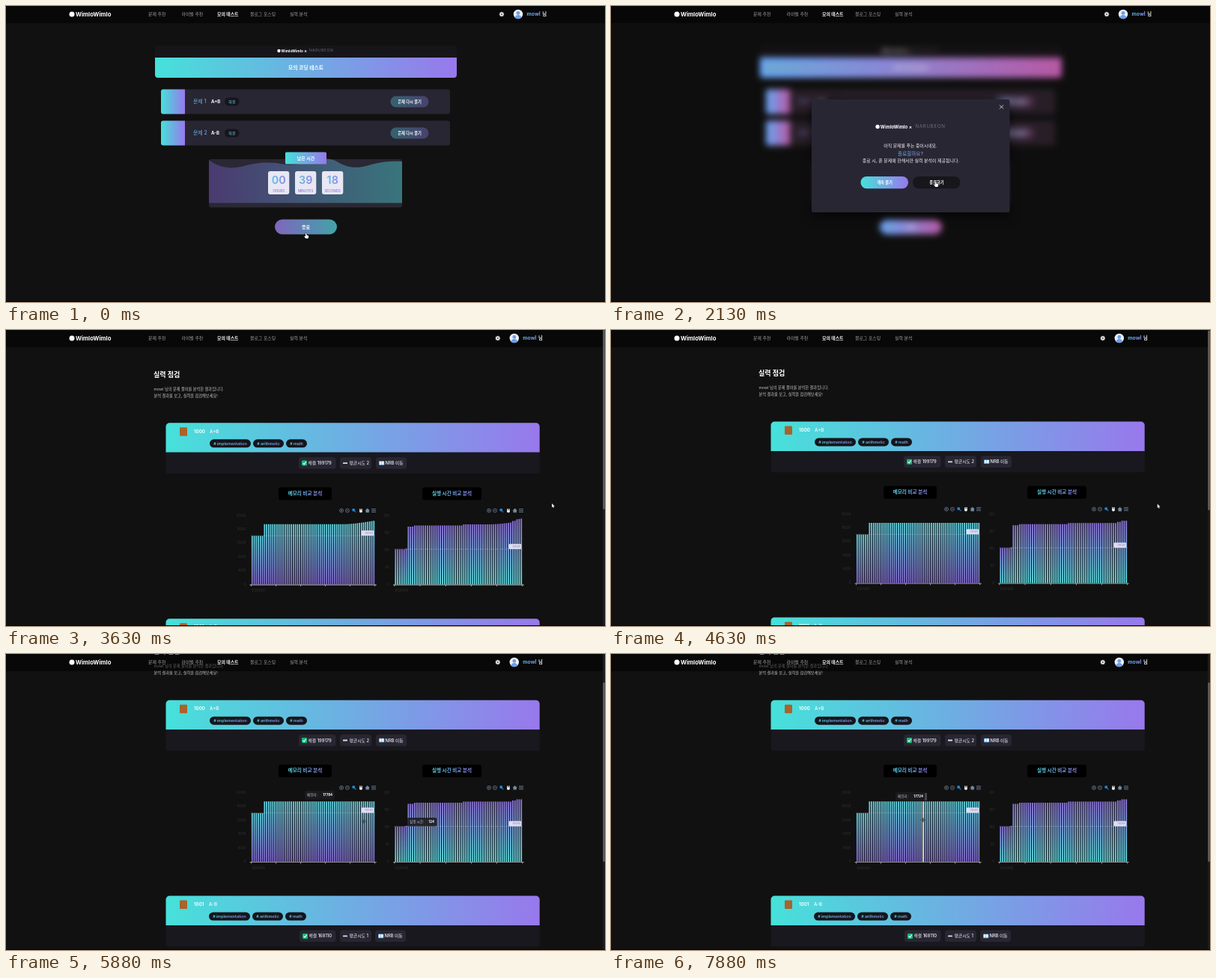
An HTML page with a canvas that plays this animation: 800 by 396 pixels, repeating every 8000 ms.

```html
<!DOCTYPE html>
<html lang="ko">
<head>
<meta charset="utf-8">
<title>모의 테스트</title>
<style>
html, body { margin: 0; width: 100%; height: 100%; overflow: hidden; background: #111; }
canvas { display: block; width: 800px; height: 396px; }
</style>
</head>
<body>
<canvas id="stage" width="800" height="396"></canvas>
<script>
const LOOP = 8000, W = 800, H = 396;
const TEAL = '#46e1da', PURPLE = '#9878ec', PANEL = '#282632', WHITE = '#f4f4f6';
const FONT = 'Inter, "Noto Sans CJK KR", "Noto Sans CJK", sans-serif';
const SITE = 'WimloWimlo', PARTNER = 'NARUBEON', USER = 'mowl';
const T_MODAL = 450, T_RESULT = 2380, T_MARKS = 3350;

const stage = document.getElementById('stage').getContext('2d');
const back = document.createElement('canvas');
back.width = W;
back.height = H;
const backCtx = back.getContext('2d');
let g = stage;

const clamp = v => Math.max(0, Math.min(1, v));
const smooth = v => v * v * (3 - 2 * v);

// Interpolates rows of [time, ...values]
function track(rows, t, ease = v => v) {
  let i = 0;
  while (i < rows.length - 2 && t >= rows[i + 1][0]) i++;
  const a = rows[i], b = rows[i + 1];
  const k = ease(clamp((t - a[0]) / (b[0] - a[0])));
  return a.slice(1).map((v, j) => v + (b[j + 1] - v) * k);
}

function lin(x0, x1, a = TEAL, b = PURPLE) {
  const f = g.createLinearGradient(x0, 0, x1, 0);
  f.addColorStop(0, a);
  f.addColorStop(1, b);
  return f;
}

function box(x, y, w, h, fill, r = 0) {
  g.fillStyle = fill;
  g.beginPath();
  g.roundRect(x, y, w, h, r);
  g.fill();
}

function disc(x, y, r, fill) {
  g.fillStyle = fill;
  g.beginPath();
  g.arc(x, y, r, 0, 7);
  g.fill();
}

function line(points, color, w = 0.8) {
  g.strokeStyle = color;
  g.lineWidth = w;
  g.beginPath();
  points.forEach(([x, y], i) => i ? g.lineTo(x, y) : g.moveTo(x, y));
  g.stroke();
}

function text(s, x, y, size, fill = WHITE, weight = 500, align = 'left') {
  g.font = `${weight} ${size}px ${FONT}`;
  g.textAlign = align;
  g.fillStyle = fill;
  g.fillText(s, x, y + size * 0.36);
}

const centered = (s, x, y, size, fill, weight) => text(s, x, y, size, fill, weight, 'center');

function logo(x, y, w) {
  const k = w / 55;
  disc(x + 4 * k, y, 3.5 * k, '#fff');
  text(SITE, x + 9 * k, y, 7.7 * k, '#fff', 700);
}

function partner(x, y, size) {
  g.letterSpacing = size * 0.13 + 'px';
  text(PARTNER, x, y, size, '#85838d', 300);
  g.letterSpacing = '0px';
}

function nav(shift) {
  box(0, 0, W, 23, 'rgba(0,0,0,.5)');
  logo(84, 11, 55);
  const items = [['문제 추천', 190], ['라이벌 추천', 234.5], ['모의 테스트', 282], ['블로그 포스팅', 326], ['실력 분석', 379]];
  items.forEach(([s, x], i) => text(s, x, 10.8, 5.9, i === 2 ? '#fff' : '#a2a2a4', i === 2 ? 700 : 400));
  g.save();
  g.translate(shift, 0);
  for (let i = 0; i < 8; i++) {
    const c = Math.cos(i * Math.PI / 4), s = Math.sin(i * Math.PI / 4);
    line([[662, 11], [662 + c * 3.3, 11 + s * 3.3]], '#eee', 1.1);
  }
  disc(662, 11, 2.5, '#eee');
  disc(662, 11, 0.9, '#333');
  disc(684, 11, 6.2, '#e9f0fb');
  g.save();
  g.beginPath();
  g.arc(684, 11, 6.2, 0, 7);
  g.clip();
  disc(684, 9.4, 2.4, '#6d9fe6');
  disc(684, 17, 4.9, '#6d9fe6');
  g.restore();
  text(USER, 695.5, 11, 6.9, lin(694, 716, '#52c0e2', '#8289ea'), 700);
  text('님', 716.3, 11, 6.3, WHITE, 700);
  g.restore();
}

function problem(n, name, y) {
  box(207, y, 386, 33, PANEL, 3);
  box(207, y, 32, 33, lin(207, 239), [3, 0, 0, 3]);
  const m = y + 16.5;
  text('문제 ' + n, 250, m, 6.9, lin(246, 276, '#55c8e0', '#8289ea'));
  text(name, 274, m, 6, '#fff', 700);
  box(292, m - 5.5, 19.5, 11, '#15161a', 5.5);
  centered('해결', 301.8, m, 5.1, lin(294, 312), 500);
  box(513.5, m - 7.5, 51, 15, lin(513, 565, '#33646f', '#49406f'), 7.5);
  centered('문제 다시 풀기', 539, m, 5.3, WHITE, 700);
}

function timer() {
  box(271, 205, 258, 64.5, '#2a2833', 3);
  g.fillStyle = lin(271, 529, '#4a3b70', '#39757c');
  g.beginPath();
  g.moveTo(271, 206);
  g.bezierCurveTo(284, 216, 300, 219, 318, 214);
  g.bezierCurveTo(336, 209, 352, 208, 373, 212);
  g.bezierCurveTo(394, 216, 420, 198, 440, 207);
  g.bezierCurveTo(455, 216, 466, 219, 488, 212);
  g.bezierCurveTo(502, 208, 515, 207, 529, 208);
  g.lineTo(529, 263.5);
  g.lineTo(271, 263.5);
  g.fill();
  box(373, 195.5, 55, 16, lin(373, 428), 1.5);
  centered('남은 시간', 400.5, 203.5, 6, '#fff', 700);
  [['00', 'HOURS'], ['39', 'MINUTES'], ['18', 'SECONDS']].forEach(([n, s], i) => {
    const x = 350 + i * 36;
    box(x, 221, 28.3, 31, '#e8e7f3', 3);
    centered(n, x + 14.2, 233, 14.3, lin(x + 3, x + 26, '#57c9e0', '#957bea'), 600);
    centered(s, x + 14.2, 247, 4.4, '#8c76dc', 500);
  });
}

function testPage(hover) {
  box(0, 0, W, H, '#111');
  box(199, 53, 403, 18, '#16151a', [4, 4, 0, 0]);
  logo(362, 60, 34);
  centered('×', 400, 60, 6, '#fff', 600);
  partner(405, 59, 4.9);
  box(199, 69, 403, 27, lin(199, 602), [0, 0, 4, 4]);
  centered('모의 코딩 테스트', 400.5, 82.5, 6.8, '#fff', 700);
  problem(1, 'A+B', 111.5);
  problem(2, 'A-B', 153.5);
  timer();
  box(359, 285.5, 83, 20, hover ? lin(359, 442, '#7f66bd', '#42a3a8') : lin(359, 442), 10);
  centered('종료', 400.5, 295.5, 6, '#fff', 700);
}

function modal(k) {
  g.save();
  g.globalAlpha = k;
  g.translate(400, 200.5);
  g.scale(0.95 + 0.05 * k, 0.95 + 0.05 * k);
  g.translate(-400, -200.5);
  g.shadowColor = 'rgba(0,0,0,.6)';
  g.shadowBlur = 14;
  g.shadowOffsetY = 5;
  box(268, 125, 264.5, 151, '#292634', 2.5);
  g.shadowColor = 'transparent';
  line([[519, 132.5], [524, 137.5]], '#eee');
  line([[524, 132.5], [519, 137.5]], '#eee');
  logo(353, 161.5, 42);
  centered('×', 400, 161.5, 6.5, '#fff', 600);
  partner(406.5, 160.5, 6.1);
  centered('아직 문제를 푸는 중이시네요.', 400, 187.3, 5.9);
  centered('종료할까요?', 400, 197.3, 6.6, lin(383, 417, '#52c5e0', '#917dea'), 500);
  centered('종료 시, 푼 문제에 한해서만 실력 분석이 제공됩니다.', 400.5, 207.3, 5.95);
  box(333.5, 228, 63.5, 16.3, lin(333, 397), 8);
  box(403, 228, 63.5, 16.3, '#17161b', 8);
  centered('계속 풀기', 365.5, 236.2, 5.3, '#fff', 700);
  centered('종료하기', 435, 236.2, 5.3, '#fff', 700);
  g.restore();
}

function chip(x, w, y, s) {
  box(x, y, w, 15.5, PANEL, 3.5);
  text(s, x + 12.5, y + 7.8, 5.8);
}

function card(y, id, name, solved, tries, dx) {
  box(213.5, y, 499.2, 39.5, lin(213, 713), [5, 5, 0, 0]);
  box(232, y + 6, 10, 11.5, '#a9632b', 1);
  text(id, 251, y + 11, 6.2, '#fff', 600);
  text(name, 272 - dx, y + 11, 6.2, '#fff', 500);
  [['implementation', 272, 55], ['arithmetic', 330, 41], ['math', 374, 28]].forEach(([s, x, w]) => {
    x -= dx;
    box(x, y + 22, w, 11, '#15151b', 5.5);
    centered('# ' + s, x + w / 2, y + 27.5, 5.3, lin(x + 3, x + w, '#4fd0dc', '#937aea'), 600);
  });
  box(213.5, y + 39.5, 499.2, 28.3, '#19181e', [0, 0, 3, 3]);
  const b = y + 46;
  chip(391 + dx, 49.5 - dx, b, '해결 ' + solved);
  chip(446, 42, b, '평균시도 ' + tries);
  chip(494 - dx, 41, b, 'NRB 이동');
  const m = b + 7.8;
  box(395 + dx, m - 3.5, 7, 7, '#16b877', 1);
  line([[396.6 + dx, m], [398.2 + dx, m + 1.7], [400.6 + dx, m - 1.8]], '#fff', 1.1);
  box(450, m - 0.9, 6, 1.8, '#dcdce2', 0.5);
  box(498 - dx, m - 2.8, 7.4, 5.6, '#4aa3e0', 0.8);
  box(498.8 - dx, m - 2.3, 2.7, 4.2, '#eef3f8');
  box(502 - dx, m - 2.3, 2.7, 4.2, '#eef3f8');
}

function tools(x, y) {
  const c = '#7688a0';
  [0, 8].forEach(d => {
    g.strokeStyle = c;
    g.lineWidth = 0.7;
    g.beginPath();
    g.arc(x + d, y, 2.5, 0, 7);
    g.stroke();
    line([[x + d - 1.3, y], [x + d + 1.3, y]], c, 0.7);
  });
  line([[x, y - 1.3], [x, y + 1.3]], c, 0.7);
  disc(x + 16.2, y - 0.8, 2, '#1f86d8');
  line([[x + 17, y], [x + 19.3, y + 2.5]], '#1f86d8', 1.1);
  box(x + 24, y - 0.4, 3.9, 3.2, '#f0f0f2', 1.4);
  for (let i = 0; i < 3; i++) box(x + 24.2 + i * 1.3, y - 2.6, 0.9, 3, '#f0f0f2', 0.4);
  g.fillStyle = c;
  g.beginPath();
  [[0, -3], [3.2, 0], [2.2, 0], [2.2, 2.7], [-2.2, 2.7], [-2.2, 0], [-3.2, 0]]
    .forEach(([a, b]) => g.lineTo(x + 34.7 + a, y + b));
  g.fill();
  for (let i = -1; i < 2; i++) box(x + 40, y + i * 2 - 0.4, 6, 0.8, c);
}

// Overshooting ease used by the growing bars
function backOut(p) {
  const u = clamp(p) - 1;
  return u * u * (2.70158 * u + 1.70158) + 1;
}

const memory = i => i < 6 ? 65 : 80.7;
const runtime = i => i < 5 ? 47 : i < 6 ? 48 : i < 9 ? 77.5 : i < 32 ? 79 : i < 55 ? 80.5 : i < 57 ? 82 : 83.5;

function chart(c, base, t, hot) {
  const step = c.w / 60;
  const front = 48.4 + 0.083 * (t - 2880);
  box(c.tx, base - 130, c.tw, 17, '#000', 3);
  centered(c.title, c.tx + c.tw / 2, base - 121.8, 6.6, lin(c.tx + 10, c.tx + c.tw - 10, '#4fd4de', '#917dea'), 700);
  tools(c.tool, base - 99);
  for (let i = 0; i <= c.rows; i++) {
    text(String(c.unit * i), c.x - 7, base - 0.5 - i * 92 / c.rows, 4.2, '#323236', 400, 'right');
  }
  text('8120000', c.x + 1, base + 8.3, 4.2, '#343438', 400);
  for (let i = 0; i < 60; i++) {
    const h = c.height(i) * backOut((front - i) / 67);
    if (h < 0.2) continue;
    const f = g.createLinearGradient(0, base - h, 0, base);
    f.addColorStop(0, c.top);
    f.addColorStop(1, c.bottom);
    box(c.x + i * step + 0.4, base - h, step * 0.64, h, i === hot ? '#edf3f8' : f);
  }
  box(c.x - 2, base, c.w + 4, 0.9, '#b9b9c0');
  for (let i = 0; i <= 5; i++) box(c.x + i * c.w / 5 - 0.5, base, 0.8, 2.6, '#b9b9c0');
  if (t < T_MARKS) return;
  const y = base - c.mark;
  g.setLineDash([1, 1]);
  line([[c.x, y], [c.x + c.w, y]], 'rgba(225,225,240,.65)', 0.6);
  g.setLineDash([]);
  box(c.x + c.w - 18.3, y - 7, 16.8, 6.8, '#e0def0', 1);
  centered(USER, c.x + c.w - 8.2, y - 3.6, 4, '#9a95cc', 500);
}

const charts = [
  { x: 327.5, w: 165.3, tx: 364, tw: 71, title: '메모리 비교 분석', tool: 448, rows: 5, unit: 4000,
    height: memory, top: '#62d9e4', bottom: '#8468d0', mark: 65.3 },
  { x: 519, w: 170.8, tx: 556, tw: 79, title: '실행 시간 비교 분석', tool: 645, rows: 4, unit: 50,
    height: runtime, top: '#8e73dc', bottom: '#5fe0e2', mark: 47.3 }
];

function tip(x, y, w, label, value, alpha) {
  g.save();
  g.globalAlpha = alpha;
  box(x, y, w, 11.5, 'rgba(28,28,33,.88)', 1.5);
  text(label + ':', x + 3, y + 5.8, 4.5, '#c9c9cf', 400);
  text(value, x + w - 3, y + 5.8, 4.4, '#fff', 700, 'right');
  g.restore();
}

function resultPage(t, px) {
  const [scroll] = track([[4600, 0], [5130, 31.2], [5400, 62.6]], t);
  const hot = t > 6000 ? Math.floor((px - charts[0].x) / charts[0].w * 60) : -1;
  box(0, 0, W, H, '#111');
  g.save();
  g.translate(0, -scroll);
  text('실력 점검', 197, 59.8, 9, '#fff', 600);
  text(USER + ' 님의 문제 풀이를 분석한 결과입니다.', 197.5, 79, 5.2, '#c6c6c8', 400);
  text('분석 결과를 보고, 실력을 점검해보세요!', 197.5, 87.7, 5.2, '#c6c6c8', 400);
  card(124.3, '1000', 'A+B', '199179', 2, 0);
  charts.forEach((c, i) => chart(c, 340.5, t, i ? -1 : hot));
  card(386.2, '1001', 'A-B', '168110', 1, 1);
  g.restore();

  if (t > 5600 && t < 6100) {
    const [x] = track([[5600, 640], [5800, 536], [6100, 536]], t);
    tip(x, 219, 39, '실행 시간', '124', Math.min(clamp((t - 5600) / 100), clamp((6150 - t) / 270)));
  }
  if (t > 5780) {
    const [x, y] = track([[5880, 399, 183], [7250, 380, 185]], t, smooth);
    tip(x, y, 40, '메모리', String(Math.round(17724 + (px - 417) * 60 / 61)), clamp((t - 5780) / 100));
    if (t > 6000) box(x + 39, y + 1, 3, 10, '#45454b');
  }
  return scroll;
}

const path = [
  [0, 401, 304], [350, 401, 304], [1000, 397, 251.5], [1130, 397, 251.5], [1630, 434, 235],
  [2380, 434, 235], [2750, 440, 237], [2880, 440, 237], [3500, 729, 232], [5130, 730, 233],
  [5450, 730, 233], [5880, 478, 224], [7250, 417, 222], [8000, 417, 222]
];

function shape(points, x, y) {
  g.beginPath();
  points.forEach(([a, b]) => g.lineTo(x + a, y + b));
  g.closePath();
  g.fillStyle = '#fff';
  g.strokeStyle = '#111';
  g.lineWidth = 0.8;
  g.stroke();
  g.fill();
}

function pointer(x, y, t) {
  if (t < T_MODAL || (t > 1480 && t < T_RESULT)) {
    shape([[-1, 0], [0.2, 0], [0.4, 2.6], [3, 3.2], [3.2, 5], [2.4, 7], [-0.8, 7], [-2.8, 4.2], [-1.8, 3.8], [-1, 4.4]], x, y);
  } else if (t > 5580) {
    line([[x - 3, y], [x + 3, y]], '#3c3c44', 1);
    line([[x, y - 3], [x, y + 3]], '#3c3c44', 1);
  } else {
    shape([[0, 0], [0, 5.2], [1.2, 4.2], [2, 6], [2.9, 5.6], [2.1, 3.9], [3.7, 3.7]], x, y);
  }
}

function draw(t) {
  const [px, py] = track(path, t, smooth);
  if (t < T_RESULT) {
    const k = smooth(clamp((t - T_MODAL) / 160));
    g = backCtx;
    testPage(t < T_MODAL);
    g = stage;
    g.drawImage(back, 0, 0);
    if (k > 0) {
      g.save();
      g.globalAlpha = k;
      g.filter = 'blur(4px) hue-rotate(45deg)';
      g.drawImage(back, 0, 0);
      g.restore();
      box(0, 0, W, H, `rgba(0,0,0,${0.16 * k})`);
      modal(k);
    }
    nav(0);
  } else {
    const scroll = resultPage(t, px);
    nav(-5.2);
    box(797, 0, 3, H, '#1c1c1e');
    box(797.3, scroll * 0.606, 2.4, 240, '#626266', 1.2);
  }
  box(0, 395, W, 1, '#080306');
  pointer(px, py, t);
}

function tick() {
  draw(performance.now() % LOOP);
  requestAnimationFrame(tick);
}
tick();
</script>
</body>
</html>
```
